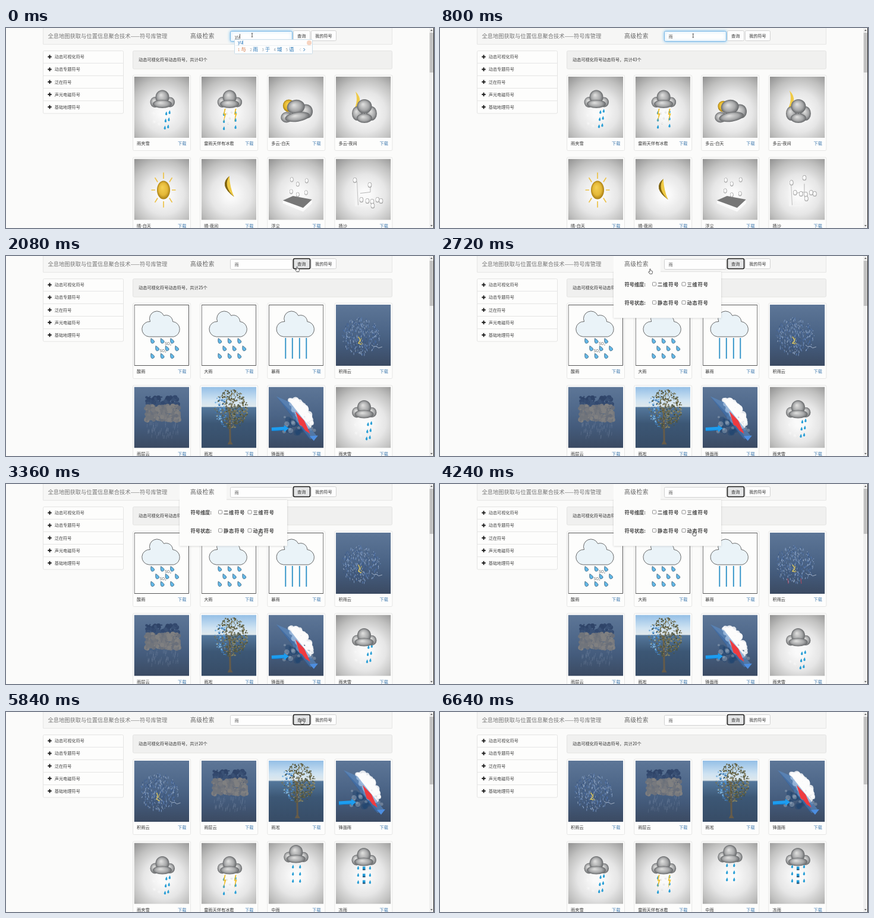
These frames come from a looping animation (720x337 px, 6720 ms). An HTML page with a canvas:

```html
<!DOCTYPE html>
<html lang="zh">
<head>
<meta charset="utf-8">
<title>符号库管理</title>
<style>
html, body { margin: 0; width: 100%; height: 100%; overflow: hidden; background: #fbfbfa; }
canvas { display: block; width: 720px; height: 337px; }
</style>
</head>
<body>
<canvas id="stage" width="720" height="337"></canvas>
<script>
const ctx = document.getElementById('stage').getContext('2d');
const LOOP = 6720, STEP = 80;
const HELD = new Set([2, 8, 14, 21, 27, 33, 39, 44, 48, 50, 54, 56, 62, 64, 67, 68, 74, 77, 80]);
const FONT = '"Noto Sans CJK SC", "Noto Sans CJK", "Noto Sans", sans-serif';
const DROP = new Path2D('M0-4Q2-.5 2 1.5A2 2 0 1 1-2 1.5Q-2-.5 0-4Z');
const CARTOON_CLOUD = new Path2D('M25 54A12.5 12.5 0 0 1 27 28.5A12.5 12.5 0 0 1 50 18.5A11 11 0 0 1 65 28.5A13 13 0 0 1 67 54Z');
const W = 92.5, H = 103;
let now = 0;

// ---- helpers ----
function text(s, x, y, size = 7.2, color = '#333', weight = 400, spacing = 0) {
  ctx.font = `${weight} ${size}px ${FONT}`;
  ctx.letterSpacing = spacing + 'px';
  ctx.fillStyle = color;
  ctx.fillText(s, x, y);
}
function rect(x, y, w, h, fill, stroke, radius = 0, line = 1) {
  ctx.beginPath();
  ctx.roundRect(x, y, w, h, radius);
  if (fill) { ctx.fillStyle = fill; ctx.fill(); }
  if (stroke) { ctx.strokeStyle = stroke; ctx.lineWidth = line; ctx.stroke(); }
}
function poly(color, ...p) {
  ctx.beginPath();
  for (let i = 0; i < p.length; i += 2) ctx.lineTo(p[i], p[i + 1]);
  ctx.closePath();
  ctx.fillStyle = color;
  ctx.fill();
}
function line(color, width, ...p) {
  ctx.beginPath();
  for (let i = 0; i < p.length; i += 2) ctx.lineTo(p[i], p[i + 1]);
  ctx.strokeStyle = color;
  ctx.lineWidth = width;
  ctx.stroke();
}
function at(x, y, draw, angle = 0, sx = 1, sy = sx) {
  ctx.save();
  ctx.translate(x, y);
  ctx.rotate(angle);
  ctx.scale(sx, sy);
  draw();
  ctx.restore();
}
function dot(x, y, r, color) {
  ctx.beginPath();
  ctx.arc(x, y, r, 0, 7);
  ctx.fillStyle = color;
  ctx.fill();
}
function ball(x, y, rx, ry, light = '#dededd', mid = '#a6a7a8', dark = '#66686a') {
  at(x, y, () => {
    const g = ctx.createRadialGradient(-.2, -.3, .05, 0, 0, 1);
    g.addColorStop(0, light); g.addColorStop(.65, mid); g.addColorStop(1, dark);
    dot(0, 0, 1, g);
  }, 0, rx, ry);
}
function random(seed) {
  return () => (seed = (seed * 16807) % 2147483647) / 2147483647;
}
function fillImage(gradient, stops) {
  stops.forEach(([p, c]) => gradient.addColorStop(p, c));
  rect(0, 0, W, H, gradient);
}
const pingPong = period => (1 - Math.cos(now / period * 2 * Math.PI)) / 2;

// ---- backgrounds ----
function greyBack(cx = 50, cy = 60) {
  fillImage(ctx.createRadialGradient(cx, cy, 8, cx, cy, 82),
    [[0, '#fafafa'], [.35, '#e6e6e6'], [.65, '#c0c0bf'], [1, '#868686']]);
}
function stormBack() {
  fillImage(ctx.createLinearGradient(0, 0, 0, H),
    [[0, '#5d7697'], [.45, '#4c6587'], [.68, '#435a7a'], [1, '#3b4a62']]);
}
function cartoonBack() {
  rect(.5, .5, W - 1, H - 1, '#fdfdfc', '#555');
  ctx.fillStyle = '#eaf3f8';
  ctx.fill(CARTOON_CLOUD);
  ctx.strokeStyle = '#444';
  ctx.lineWidth = .8;
  ctx.stroke(CARTOON_CLOUD);
}

// ---- weather parts ----
function cloud(x, y) {
  ball(x - 12.5, y + 5, 8, 9);
  ball(x + 13, y + 5, 8, 8.5);
  ball(x, y - 3.5, 11.5, 12);
  ball(x, y + 8, 16, 7);
}
function drop(x, y, color = '#2a9fd6', scale = .85) {
  at(x, y, () => { ctx.fillStyle = color; ctx.fill(DROP); }, .1, scale);
}
function rain(x, y, slope = 0, rows = 3) {
  const shift = (now * .012 + 8) % 12;
  for (let i = 0; i < rows; i++) {
    const fall = i * 12 + shift;
    drop(x - fall * slope, y + fall);
  }
}
function flake(x, y) {
  for (let k = 0; k < 3; k++) {
    const c = Math.cos(k * 1.05 + .3) * 3, s = Math.sin(k * 1.05 + .3) * 3;
    line('#f8f8f8', .8, x - c, y - s, x + c, y + s);
  }
}
function crescent(color, x1, y1, x2, y2, outerX, outerY, innerX, innerY) {
  ctx.beginPath();
  ctx.moveTo(x1, y1);
  ctx.quadraticCurveTo(outerX, outerY, x2, y2);
  ctx.quadraticCurveTo(innerX, innerY, x1, y1);
  ctx.fillStyle = color;
  ctx.fill();
}
function cartoonDrops() {
  for (let row = 0; row < 3; row++)
    for (let col = 0; col < 3; col++)
      at(30.5 + col * 16.5 + (row === 1 ? 8 : 0), 61 + row * 12.7, () => {
        ctx.fillStyle = '#62b8e8';
        ctx.fill(DROP);
        ctx.strokeStyle = '#3a5a70';
        ctx.lineWidth = .5;
        ctx.stroke(DROP);
      }, -.45, 1.45, 1.2);
}

// ---- symbols, in a 92.5 x 103 box ----
const SYMBOLS = {
  '雨夹雪'() {
    greyBack();
    const sway = pingPong(1600) * 3;
    [[33, 62], [41, 60], [46, 69], [34, 76], [42, 80]].forEach(([x, y]) => flake(x, y + sway));
    rain(55, 54, .1);
    rain(60.5, 52, .1);
    cloud(47.5, 38);
  },
  '雷雨天伴有冰雹'() {
    greyBack();
    const low = Math.floor(now / 240) % 3 * 2;
    [[43, 62], [48, 70], [45, 79], [51, 60]].forEach(([x, y]) => ball(x, y + low / 2, 1.4, 1.6, '#fff', '#eee', '#bbb'));
    rain(38, 55);
    rain(57.5, 53);
    [36, 54].forEach(x =>
      poly('#efc02f', x + 3, 54 + low, x + 1, 64 + low, x + 3, 64 + low, x + 1, 77 + low, x + 6, 62 + low, x + 3, 62 + low, x + 5, 54 + low));
    cloud(47.5, 38);
  },
  '多云-白天'() {
    greyBack();
    const hide = pingPong(3040);
    ball(34 + hide, 49 + hide * 2, 10 - hide * 2, 10.5 - hide * 2, '#f6cf50', '#e3b62c', '#a57d12');
    at(46, 58, () => {
      ball(-17, 8, 10, 9);
      ball(17, 3, 11, 12);
      ball(1, -7, 15, 12);
      ball(1, 10, 21, 8);
    }, -.15);
  },
  '多云-夜间'() {
    greyBack();
    const up = pingPong(3040) * 3;
    crescent('#f0cb47', 33, 25 - up, 27, 61 - up, 50, 42 - up, 39, 44 - up);
    ball(36, 62, 9, 12);
    ball(60, 62, 9, 12);
    ball(48, 50, 12.5, 12);
    ball(48, 70, 13, 8);
  },
  '晴-白天'() {
    greyBack();
    for (let k = 0; k < 8; k++) {
      const c = Math.cos(k * Math.PI / 4), s = Math.sin(k * Math.PI / 4);
      line('#edc247', 1.7, 49.5 + c * 14, 52.5 + s * 19, 49.5 + c * 20.5, 52.5 + s * 29.5);
    }
    ball(49.5, 52.5, 11, 15.5, '#f4cf52', '#e4b838', '#a87e14');
  },
  '晴-夜间'() {
    greyBack();
    at(0, pingPong(3040) * 9, () => {
      crescent('#80640f', 47, 29, 55, 64, 28, 44, 46, 49);
      crescent('#efca45', 47, 29, 55, 64, 36, 46, 48, 48);
    });
  },
  '浮尘'() {
    greyBack();
    poly('#fafafa', 24, 70, 58, 82, 73, 68, 73, 75, 58, 89, 24, 75);
    poly('#777', 24, 70, 41, 62.5, 73, 68.5, 58, 82.5);
    [[39, 35], [49, 42], [64, 36], [38, 55], [49, 61], [63, 58]].forEach(([x, y], i) =>
      ball(x, y + Math.sin(now / 400 + i), 2.8, 4, '#fff', '#f4f4f4', '#8a8a8a'));
  },
  '扬沙'() {
    greyBack();
    const lift = pingPong(3040);
    poly('#f4f4f4', 32, 36, 35, 36, 37, 78, 56, 77, 56, 80, 32, 80);
    line('#aaa', .7, 35.5, 38, 37.5, 78);
    line('#999', .7, 41, 58, 58, 56, 58, 42);
    [[32, 36], [43, 69], [53, 71], [61, 72], [70, 69], [76, 71], [62, 79], [57, 44]].forEach(([x, y], i) =>
      ball(x + lift * (i === 7 ? 2 : i === 0 ? 8 : -1), y - lift * (i === 0 ? -8 : 22), 3.3, 4.5, '#fff', '#f3f3f3', '#8d8d8d'));
  },
  '酸雨'() {
    cartoonBack();
    cartoonDrops();
    text('SO₂', 51.5, 66, 6.5, '#666');
    text('SO₂', 43, 78, 6.5, '#666');
  },
  '大雨'() {
    cartoonBack();
    cartoonDrops();
  },
  '暴雨'() {
    cartoonBack();
    [28.5, 40, 52, 63.5].forEach(x => line('#3193c8', 1.9, x, 56, x, 91));
  },
  '积雨云'() {
    stormBack();
    const rnd = random(77), colors = ['#3f5f94', '#5578ad', '#7e9bc4', '#36537f', '#9cb0cc'];
    const spin = now / 900;
    for (let i = 0; i < 420; i++) {
      const a = rnd() * 6.28, r = Math.sqrt(rnd()), wave = Math.sin(spin + i) * 1.2;
      const x = 42 + Math.cos(a) * r * 32 + wave, y = 52 + Math.sin(a) * r * 31;
      line(colors[i % 5], .9, x, y, x + rnd() * 2 - 1, y + 1 + rnd() * 3);
    }
    const flash = Math.floor(now / 160) % 3;
    line('#d9c45e', 1.5, 38, 54, 40 + flash, 60, 38, 65, 43, 68 - flash);
    line('#c3b568', 1, 43, 56, 41, 62, 45, 66);
    line('#b9c6d6', .8, 60, 68, 64, 71, 68, 70, 72, 73, 78, 71);
    if (now > 4000 && now < 5280) [30, 52].forEach(x => line('#b6495e', 1, x, 77, x + 1, 86));
  },
  '雨层云'() {
    stormBack();
    const rnd = random(31);
    const puffs = (n, x, y, w, h, colors) => {
      for (let i = 0; i < n; i++) dot(x + rnd() * w, y + rnd() * h, 1 + rnd() * 3, colors[i % colors.length]);
    };
    puffs(150, 21, 16, 54, 24, ['#33496e', '#3a5175', '#2f4468']);
    puffs(260, 19, 32, 57, 25, ['#77797e', '#70747b', '#808081', '#696f7a']);
    for (let i = 0; i < 55; i++) {
      const x = 22 + rnd() * 52, y = 58 + (rnd() * 24 + now * .02) % 24;
      line('rgba(150,165,185,.35)', .6, x, y, x - .5, y + 6);
    }
  },
  '雨凇'() {
    fillImage(ctx.createLinearGradient(0, 0, 0, H),
      [[0, '#94bfe6'], [.22, '#cfe3f2'], [.32, '#dfe8ec'], [.34, '#54779b'], [.6, '#3c5775'], [1, '#374c66']]);
    poly('#665b48', 46, 36, 49, 36, 50, 92, 53, 97, 44, 97, 47, 91);
    [[30, 42, 62], [65, 30, 58], [37, 22, 45], [58, 16, 42], [24, 50, 66], [70, 50, 68]].forEach(([x, y, y0]) =>
      line('#6a604c', 1, 48, y0, (48 + x) / 2, (y0 + y) / 2 - 2, x, y));
    const rnd = random(915), bark = ['#5d5d43', '#77724f', '#49523f', '#8a8a70'], ice = ['#4f8fc9', '#7db4df', '#3f76ad'];
    for (let i = 0; i < 430; i++) {
      const a = rnd() * 6.28, r = Math.sqrt(rnd());
      const x = 50 + Math.cos(a) * r * 28, y = 37 + Math.sin(a) * r * 33;
      const set = x < 42 && y > 18 && rnd() < .75 ? ice : bark;
      dot(x, y, .6 + rnd() * .9, set[i % set.length]);
    }
  },
  '锋面雨'() {
    stormBack();
    const rnd = random(58), drift = now / 700;
    for (let i = 0; i < 26; i++)
      dot(31 + rnd() * 26, 55 + rnd() * 25, 2 + rnd() * 4, 'rgba(34,70,112,.45)');
    for (let i = 0; i < 14; i++)
      dot(22 + rnd() * 55, 46 + rnd() * 30, 1.5 + rnd() * 3, 'rgba(190,200,212,.35)');
    for (let i = 0; i < 60; i++) {
      const u = i / 60;
      dot(44 + u * 20 + rnd() * 22 - 9, 18 + u * 42 + rnd() * 8 + Math.sin(drift + i), 3 + rnd() * 4, 'rgba(253,253,253,.85)');
    }
    poly('rgba(92,142,200,.6)', 13, 16, 36, 26, 82, 84, 70, 88);
    poly('rgba(45,90,150,.45)', 13, 16, 46, 50, 74, 88, 66, 86);
    poly('#ef3b40', 45, 41, 60, 57, 70, 79, 62, 74, 56, 66, 52, 64);
    poly('#4d8ee0', 69, 83, 83, 82, 76, 91);
    at(5, 71, () => {
      poly('#1c9df0', 0, -2.5, 21, -3, 21, -6, 29, 0, 21, 6, 21, 3, 0, 3.5);
      line('#1270bd', .8, 0, 3, 21, 2.7);
    }, -.04);
  },
  '中雨'() {
    greyBack(47, 55);
    rain(41, 34);
    rain(53, 34);
    cloud(46, 19);
  },
  '冻雨'() {
    greyBack(47, 55);
    rain(37.5, 36);
    rain(57.5, 36);
    [40, 52, 63].forEach(y => {
      rect(45, y, 4.5, 5, '#1e9ad8');
      rect(45, y + 4, 4.5, 2, '#234f70');
    });
    cloud(47, 24);
  }
};

// ---- page ----
const RESULTS = [
  { from: 0, count: 43, thumb: 75, names: ['雨夹雪', '雷雨天伴有冰雹', '多云-白天', '多云-夜间', '晴-白天', '晴-夜间', '浮尘', '扬沙'] },
  { from: 1840, count: 25, thumb: 84, names: ['酸雨', '大雨', '暴雨', '积雨云', '雨层云', '雨凇', '锋面雨', '雨夹雪'] },
  { from: 5280, count: 20, thumb: 122, names: ['积雨云', '雨层云', '雨凇', '锋面雨', '雨夹雪', '雷雨天伴有冰雹', '中雨', '冻雨'] }
];
const CATEGORIES = ['动态可视化符号', '动态专题符号', '泛在符号', '声光电磁符号', '基础地理符号'];
// time, x, y of the pointer
const POINTER = [[0, 414, 12], [720, 414, 12], [1040, 489.5, 18], [2240, 489.5, 18], [2480, 345, 15],
  [2640, 345, 15], [3040, 427, 79], [4400, 427, 79], [4800, 497.5, 12], [6000, 497.5, 12]];

function pointerAt(t) {
  const i = POINTER.findIndex(p => p[0] > t);
  if (i < 0) return null;
  const [t0, x0, y0] = POINTER[i - 1], [t1, x1, y1] = POINTER[i];
  const u = (t - t0) / (t1 - t0), e = u * u * (3 - 2 * u);
  return { x: x0 + (x1 - x0) * e, y: y0 + (y1 - y0) * e };
}

function button(label, x, w, hover, focus) {
  rect(x + .5, 4.5, w, 17, hover || focus ? '#e4e5e6' : '#fdfdfd', focus ? '#1c1c1c' : hover ? '#adadad' : '#d2d2d2', 2, focus ? 1.6 : 1);
  text(label, x + 7, 13.2);
}

function header(hover, focus) {
  rect(62.5, -4, 587, 31.5, '#f6f6f5', '#e6e6e5');
  text('全息地图获取与位置信息聚合技术——符号库管理', 70.5, 13, 9.27, '#777');
  const typing = now < 1760;
  ctx.save();
  if (typing) { ctx.shadowColor = '#7fc0ee'; ctx.shadowBlur = 5; }
  rect(377.5, 5.5, 104, 17, '#fefefe', typing ? '#7ab8e6' : '#d0d0d0', 2);
  ctx.restore();
  if (now < 400) {
    text('yu', 385, 14, 7.2, '#555');
    line('#777', .6, 385, 18.5, 393, 18.5);
    line('#222', .7, 393.5, 10, 393.5, 18);
  } else text('雨', 384.5, 14, 7.2, '#555');
  button('查询', 483, 28, hover, focus);
  button('我的符号', 513, 42, false, false);
}

function sidebar() {
  rect(62.5, 38.5, 135, 105.5, '#fdfdfc', '#e4e4e3', 2);
  CATEGORIES.forEach((name, i) => {
    const y = 48.5 + i * 21.15;
    if (i) line('#e4e4e3', 1, 62.5, y - 10.4, 197.5, y - 10.4);
    rect(70.3, y - 1, 6.4, 2, '#222');
    rect(72.5, y - 3.2, 2, 6.4, '#222');
    text(name, 81.7, y, 7.2, '#444');
  });
}

function card(name, i) {
  const x = 213 + (i % 4) * 113.15, y = 79.5 + (i >> 2) * 138.5;
  rect(x + .5, y, 97, 127, '#fdfdfc', '#e6e6e5', 2);
  ctx.save();
  ctx.translate(x + 2.5, y + 2.5);
  ctx.beginPath();
  ctx.rect(0, 0, W, H);
  ctx.clip();
  SYMBOLS[name]();
  ctx.restore();
  text(name, x + 7, y + 115);
  text('下载', x + 76, y + 115, 7.2, '#3d78ae');
}

function scrollbar(end) {
  rect(712, 0, 8, 337, '#f0f0f0');
  rect(712.7, 8, 6, end - 8, '#c1c1c1');
  poly('#666', 713.8, 5, 715.8, 2.5, 717.8, 5);
  poly('#666', 713.8, 332, 715.8, 334.5, 717.8, 332);
  rect(719, 0, 1, 337, '#222');
}

function candidates() {
  rect(384.5, 19.5, 131, 24, '#fdfdfd', '#c9dce8', 1);
  text('yu', 390, 24.5, 7.5, '#2676bd');
  line('#2676bd', .6, 398.5, 21, 398.5, 28);
  line('#e2ebf0', .7, 386, 29.5, 514, 29.5);
  [...'与雨于域语'].forEach((c, i) => {
    text(i + 1, 390 + i * 20.2, 36.5, 6, i ? '#8a9aa5' : '#d98a60');
    text(c, 395.3 + i * 20.2, 36, 8.5, i ? '#2474b5' : '#d4733f');
  });
  line('#ccd6dc', .9, 496, 34, 494, 36.5, 496, 39);
  line('#2474b5', 1, 500.5, 34, 502.8, 36.5, 500.5, 39);
  dot(510, 25, 4, '#f6d3c0');
}

function filterPanel(checked) {
  ctx.save();
  ctx.shadowColor = 'rgba(0,0,0,.18)';
  ctx.shadowBlur = 3;
  rect(292, 27, 181, 77.5, '#fcfcfb');
  ctx.restore();
  rect(292, 0, 79, 29, '#fcfcfb');
  const rows = [['符号维度:', '二维符号', '三维符号'], ['符号状态:', '静态符号', '动态符号']];
  rows.forEach(([label, ...options], r) => {
    const y = 47.5 + r * 31;
    text(label, 310.5, y, 8.2, '#444', 700);
    options.forEach((name, k) => {
      const x = 357.5 + k * 49.5, on = checked && r && k;
      rect(x, y - 3.2, 6, 6, on ? '#1a73e8' : '#fff', on ? '#1a73e8' : '#777', 1, .8);
      if (on) line('#fff', .9, x + 1.3, y, x + 2.6, y + 1.4, x + 4.8, y - 1.6);
      text(name, x + 8.5, y, 8.2, '#444', 700, .9);
    });
  });
}

function pointer({ x, y }) {
  if (x < 482 && x > 377 && y < 23) {
    line('#333', .8, x - 1.3, y - 3, x + 1.3, y - 3);
    line('#333', .8, x, y - 3, x, y + 3);
    line('#333', .8, x - 1.3, y + 3, x + 1.3, y + 3);
    return;
  }
  at(x, y, () => {
    const hand = new Path2D('M-.8 .5Q0-.6 .8 .5V3L3.6 3.8Q4.2 4 4 5.2L3.2 8.5H-.6L-3 5.2Q-2.6 4-.8 5.2Z');
    ctx.fillStyle = '#fff';
    ctx.fill(hand);
    ctx.strokeStyle = '#222';
    ctx.lineWidth = .7;
    ctx.stroke(hand);
  });
}

function draw() {
  const mouse = pointerAt(now);
  const hover = !!mouse && mouse.x > 483 && mouse.x < 512 && mouse.y < 22;
  const focus = (now >= 1760 && now < 4400) || now >= 5200;
  const result = RESULTS.filter(r => now >= r.from).pop();
  rect(0, 0, 720, 337, '#fbfbfa');
  ctx.textBaseline = 'middle';
  header(hover, focus);
  sidebar();
  rect(213.5, 38.5, 436, 30.5, '#f0f0ef', '#e3e3e2', 2);
  text(`动态可视化符号动态符号，共计${result.count}个`, 223, 53.7);
  result.names.forEach(card);
  scrollbar(result.thumb);
  if (now < 400) candidates();
  if (now >= 2480 && now < 4640) filterPanel(now >= 4400);
  text('高级检索', 310, 13, 9.7, '#666', 400, .6);
  if (mouse) pointer(mouse);
}

function frame(time) {
  let step = Math.floor(time % LOOP / STEP);
  while (HELD.has(step)) step--;
  now = step * STEP;
  draw();
  requestAnimationFrame(frame);
}
requestAnimationFrame(frame);
</script>
</body>
</html>
```
